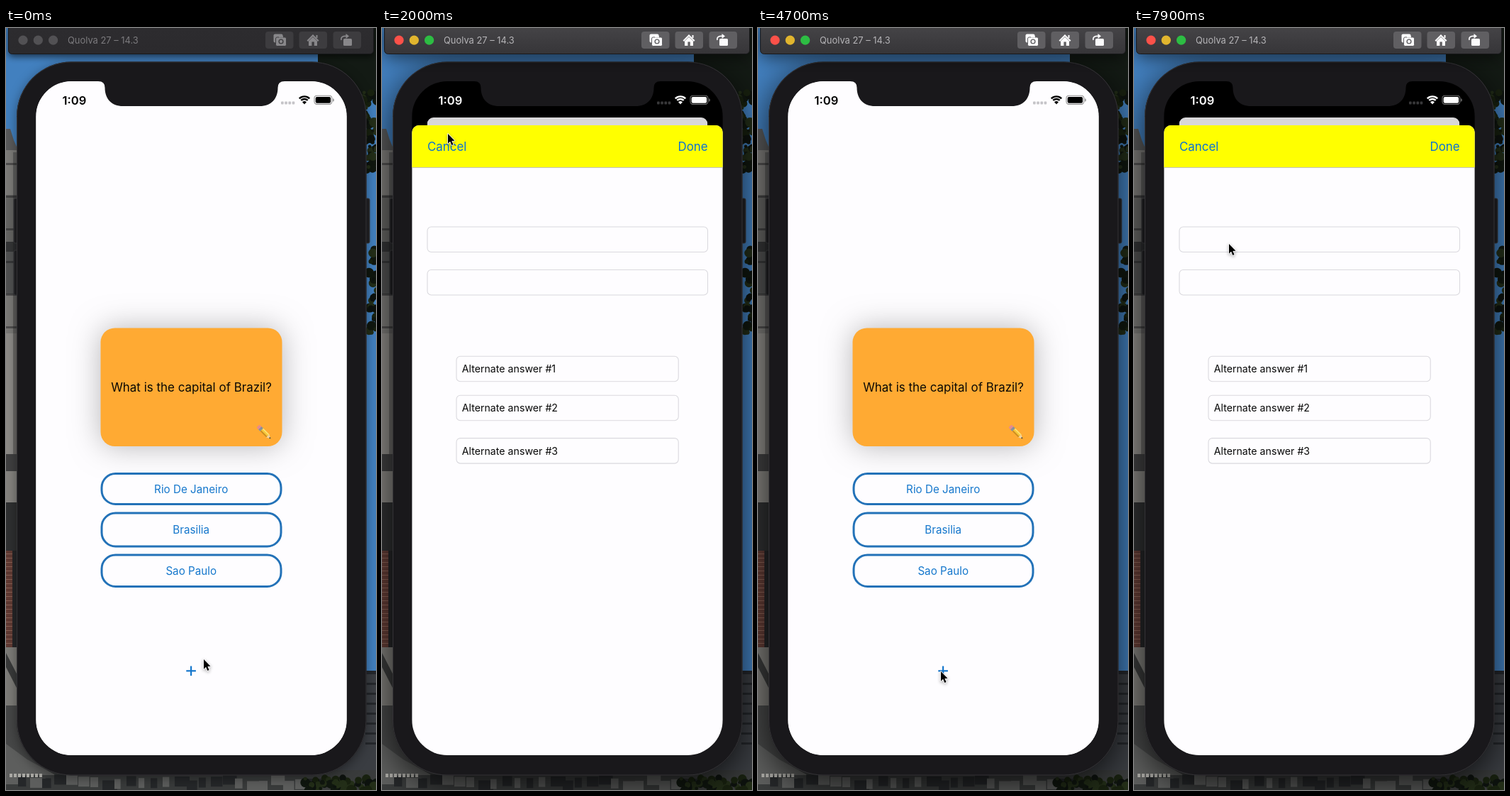
Animation, 522 px wide and 1073 px high, one loop 8000 ms. Source, as an HTML page with a canvas:

```html
<!DOCTYPE html>
<html lang="en">
<head>
<meta charset="utf-8">
<style>
html, body { margin: 0; width: 522px; height: 1073px; overflow: hidden; background: #222; }
canvas { display: block; }
</style>
</head>
<body>
<canvas id="stage" width="522" height="1073"></canvas>
<script>
const ctx = document.getElementById('stage').getContext('2d');
const LOOP = 8000, STEP = 100;
const FONT = 'Inter, "Open Sans", sans-serif';
const BODY = '#19181b', PAPER = '#fefdff', BLUE = '#1577cc';
const SCREEN = { x: 42.2, y: 75, w: 438.6, h: 949, r: 50 };
const SHEET_TOP = 137, SHEET_TRAVEL = 1024 - SHEET_TOP;
const OPEN = 801, CLOSE = 2666, REOPEN = 6382;

const clamp = v => Math.max(0, Math.min(1, v));
const mix = (a, b, p) => a + (b - a) * p;
const smooth = p => p * p * (3 - 2 * p);

// Critically damped spring, t in ms
function spring(t) {
  if (t <= 0) return 0;
  const x = t * 0.01826;
  return x > 9.5 ? 1 : 1 - (1 + x) * Math.exp(-x);
}

// Runs an easing through open, close and open again
const presented = (t, ease) =>
  t < CLOSE ? ease(t - OPEN) : t < REOPEN ? 1 - ease(t - CLOSE) : ease(t - REOPEN);

// time, x, y
const cursorPath = [
  [0, 279, 889], [500, 263, 910], [1200, 263, 910], [1900, 93, 149], [2100, 93, 149],
  [2400, 92, 162], [3300, 92, 162], [4300, 258, 906], [6900, 258, 906], [7700, 134, 304], [8000, 134, 304]
];

function cursorAt(t) {
  const i = cursorPath.findIndex(k => k[0] > t);
  const [a, b] = [cursorPath[i - 1], cursorPath[i]];
  const p = smooth((t - a[0]) / (b[0] - a[0]));
  return [mix(a[1], b[1], p), mix(a[2], b[2], p)];
}

function seeded(seed) {
  return () => (seed = (seed * 16807) % 2147483647) / 2147483647;
}

function rect(x, y, w, h, color) {
  ctx.fillStyle = color;
  ctx.fillRect(x, y, w, h);
}

function rounded(x, y, w, h, r, fill, stroke, width = 1) {
  ctx.beginPath();
  ctx.roundRect(x, y, w, h, r);
  if (fill) { ctx.fillStyle = fill; ctx.fill(); }
  if (stroke) { ctx.strokeStyle = stroke; ctx.lineWidth = width; ctx.stroke(); }
}

function disc(x, y, r, color) {
  ctx.fillStyle = color;
  ctx.beginPath();
  ctx.arc(x, y, r, 0, Math.PI * 2);
  ctx.fill();
}

function poly(points, color) {
  ctx.beginPath();
  points.forEach(([x, y]) => ctx.lineTo(x, y));
  ctx.closePath();
  ctx.fillStyle = color;
  ctx.fill();
}

function text(s, x, y, size, color, align = 'left', weight = 400) {
  ctx.font = `${weight} ${size}px ${FONT}`;
  ctx.fillStyle = color;
  ctx.textAlign = align;
  ctx.textBaseline = 'alphabetic';
  ctx.fillText(s, x, y);
}

function setShadow(color, blur, dy = 0) {
  ctx.shadowColor = color;
  ctx.shadowBlur = blur;
  ctx.shadowOffsetY = dy;
}

function foliage(x, y, w, h, count, seed) {
  const rnd = seeded(seed);
  const tones = ['#10170f', '#18210f', '#232e18', '#0d120e'];
  for (let i = 0; i < count; i++) {
    const px = x + rnd() * w, py = y + rnd() * h;
    disc(px, py, 2 + rnd() * 5, tones[Math.floor(rnd() * 4)]);
  }
}

function drawBackdrop() {
  rect(0, 0, 522, 1073, '#4280bf');

  // Stone facade: top, height, tone
  const bands = [
    [172, 63, '#7d7c79'], [235, 66, '#646462'], [301, 14, '#343536'], [315, 60, '#505151'],
    [375, 55, '#7b7a77'], [430, 170, '#8d8b87'], [600, 24, '#404041'], [624, 44, '#85837f'],
    [668, 68, '#2f3031'], [736, 136, '#613b34'], [872, 82, '#7d7c78'], [954, 119, '#464747']
  ];
  poly([[0, 142], [6, 142], [11, 158], [18, 174], [0, 174]], '#595a5b');
  for (const [y, h, tone] of bands) rect(0, y, 60, h, tone);
  rect(10, 175, 8, 425, 'rgba(25,26,28,.3)');
  for (let y = 190; y < 430; y += 46) rect(0, y, 15, 3, 'rgba(25,26,28,.45)');
  for (let y = 740; y < 870; y += 6) rect(0, y, 9, 1, '#8a6155');
  rect(9, 736, 9, 136, '#252628');
  poly([[0, 880], [18, 915], [18, 935], [0, 900]], '#393a3a');

  // Trees and far roof
  rect(440, 0, 82, 95, '#131a14');
  foliage(500, 90, 24, 115, 75, 17);
  foliage(512, 310, 12, 120, 32, 91);
  rect(460, 905, 62, 168, '#3a3d42');
  rect(500, 905, 22, 5, '#24272c');
  for (let y = 922; y < 1010; y += 14) rect(507, y, 15, 3, '#24272b');

  // Lower ledge
  rect(0, 1045, 522, 28, '#393b3b');
  poly([[0, 1008], [30, 1030], [70, 1052], [0, 1052]], '#5d5e5d');
  const rnd = seeded(53);
  for (let x = 0; x < 430; x += 17) {
    rect(x, 1051 + rnd() * 10, 8 + rnd() * 14, 14, rnd() > 0.5 ? '#252729' : '#5d5e5d');
  }
  for (let x = 5; x < 48; x += 6) rect(x, 1050, 4, 5, '#aaa9a4');
  foliage(422, 1056, 102, 19, 70, 33);
}

function drawToolbarIcons(ink, key) {
  ctx.lineJoin = 'round';
  // Stacked camera
  rounded(377.5, 8.5, 13, 12, 2, ink);
  rounded(380.5, 13, 15, 12.5, 2, ink, key, 1);
  rect(385, 11.5, 6, 2, ink);
  disc(388, 19, 3.6, key);
  disc(388, 19, 2.2, ink);
  // House
  poly([[424.5, 17.5], [433, 9], [441.5, 17.5], [440, 19], [433, 12], [426, 19]], ink);
  poly([[427, 18.5], [433, 12.8], [439, 18.5], [439, 25], [427, 25]], ink);
  rect(431.4, 19.5, 3.4, 5.5, key);
  rect(437.5, 10, 2, 4, ink);
  // Rotate
  rounded(476, 15, 12, 10, 1.5, ink);
  ctx.strokeStyle = ink;
  ctx.lineWidth = 1.6;
  ctx.beginPath();
  ctx.moveTo(473, 17);
  ctx.bezierCurveTo(472, 12, 476, 11, 481, 11.5);
  ctx.stroke();
  poly([[479.5, 8], [484, 11.5], [479.5, 15]], ink);
}

function drawToolbar(active) {
  const fill = ctx.createLinearGradient(0, 0, 0, 37);
  fill.addColorStop(0, active ? '#444346' : '#2d2c2f');
  fill.addColorStop(1, active ? '#363538' : '#2b2a2d');
  setShadow('rgba(0,0,0,.6)', active ? 24 : 10, 4);
  rounded(3.5, -8, 515, 44.5, 5, fill);
  setShadow('transparent', 0);
  rounded(3.5, -8, 515, 44.5, 5, null, '#19191b', 1);
  const lights = active ? ['#fc5149', '#e1b52e', '#2dbd43'] : Array(3).fill('#525154');
  lights.forEach((c, i) => disc(24 + i * 21.3, 17.2, 6.6, c));
  text('Quolva 27 – 14.3', 87, 22, 12.9, active ? '#b5b4b7' : '#7c7b7e');
  const key = active ? '#605f62' : '#3d3c3f';
  for (const x of [366, 413.5, 461.5]) rounded(x, 5, 39.5, 24, 4, key);
  drawToolbarIcons(active ? '#fbfbfc' : '#88878a', key);
}

function drawDevice(active) {
  for (const [x, y] of [[11, 240], [11, 313], [507, 240]]) {
    rounded(x, y, 6, 63, 2, '#222225', '#3d3d40', 1);
  }
  setShadow(active ? 'rgba(0,0,0,.75)' : 'rgba(0,0,0,.4)', active ? 50 : 16, active ? 12 : 4);
  rounded(15, 47.5, 493.5, 1005, 77, BODY);
  setShadow('transparent', 0);
  rounded(15.5, 48, 492.5, 1004, 76.5, null, '#343336', 1);
}

function drawPencil() {
  ctx.save();
  ctx.translate(355.5, 560.5);
  ctx.rotate(Math.PI / 4);
  rounded(0, -3, 5, 6, 1.5, '#e58b8d');
  rect(4, -3, 3.5, 6, '#87919a');
  rect(7.5, -3, 12, 6, '#f5c83c');
  rect(7.5, 1, 12, 2, '#cf8d20');
  rect(7.5, -3, 12, 1.5, '#ffe477');
  poly([[19.5, -3], [25, 0], [19.5, 3]], '#f1d3a1');
  poly([[23, -1.2], [25.5, 0], [23, 1.2]], '#333');
  ctx.restore();
}

function drawQuiz(p) {
  const { x, y, w, h, r } = SCREEN;
  const scale = mix(1, 0.902, p);
  ctx.save();
  ctx.translate(261.5, mix(y, 126, p));
  ctx.scale(scale, scale);
  ctx.translate(-261.5, -y);
  ctx.beginPath();
  ctx.roundRect(x, y, w, h, mix(r, 10, p));
  ctx.clip();
  rect(x, y, w, h, PAPER);

  setShadow('rgba(0,0,0,.28)', 42);
  rounded(133.5, 422.5, 256, 166.5, 20, '#ffaa33');
  setShadow('transparent', 0);
  text('What is the capital of Brazil?', 261.5, 512.3, 16.95, '#0b0905', 'center');
  drawPencil();

  for (const [label, top, height] of [['Rio De Janeiro', 626, 46], ['Brasilia', 681.5, 50], ['Sao Paulo', 740.5, 47.5]]) {
    rounded(135, top + 1.5, 253, height - 3, 19.5, PAPER, '#2372b8', 3);
    text(label, 261.2, top + height / 2 + 5.8, 15.2, BLUE, 'center');
  }
  rect(254.3, 904.2, 13.6, 2.2, BLUE);
  rect(260, 898.5, 2.2, 13.6, BLUE);
  if (p > 0) rect(x, y, w, h, `rgba(0,0,0,${0.15 * p})`);
  ctx.restore();
}

function drawSheet(top) {
  const { x, w } = SCREEN;
  ctx.save();
  ctx.translate(0, top);
  rounded(x, 0, w, 960, [10, 10, 0, 0], PAPER);
  rounded(x, 0, w, 59, [10, 10, 0, 0], '#ffff00');
  rect(x, 59, w, 0.8, '#b4b4a4');
  text('Cancel', 64, 35.7, 16.9, '#0a72d6');
  text('Done', 459.7, 35.7, 16.9, '#0a72d6', 'right');
  const field = (fx, fy, fw) => rounded(fx, fy, fw, 35.5, 5.5, PAPER, '#dad9de', 1.1);
  field(64, 143, 395.5);
  field(64, 203.5, 395.5);
  [325.3, 380.3, 440.6].forEach((fy, i) => {
    field(105, fy, 313.2);
    text(`Alternate answer #${i + 1}`, 112.7, fy + 23, 14.2, '#080808');
  });
  ctx.restore();
}

function drawStatus(p, amount) {
  const level = Math.round(255 * amount);
  const ink = `rgb(${level},${level},${level})`;
  text('1:09', 79.5, 107.7, 16.6, ink, 'left', 600);
  for (let i = 0; i < 4; i++) {
    rounded(388 + i * 5.2, 103.5, 3.7, 4, 1, p > 0.5 ? '#38383a' : '#c5c4c8');
  }
  // Wi-Fi fan
  ctx.strokeStyle = ink;
  ctx.lineWidth = 2.3;
  ctx.lineCap = 'butt';
  for (const r of [10.2, 6.6]) {
    ctx.beginPath();
    ctx.arc(421, 106.6, r, Math.PI * 1.25, Math.PI * 1.75);
    ctx.stroke();
  }
  poly([[421, 107.5], [418, 104.3], [419.6, 103.2], [421, 102.9], [422.4, 103.2], [424, 104.3]], ink);
  // Battery
  ctx.globalAlpha = 0.45;
  rounded(435, 95.2, 24.8, 12.2, 3.6, null, ink, 1.1);
  rounded(461.2, 99.3, 1.6, 4.2, [0, 1.5, 1.5, 0], ink);
  ctx.globalAlpha = 1;
  rounded(436.7, 96.9, 21.4, 8.8, 2, ink);
}

function drawNotch() {
  ctx.beginPath();
  ctx.moveTo(130, 73);
  ctx.lineTo(130, 75);
  ctx.quadraticCurveTo(139.5, 75, 139.5, 84);
  ctx.bezierCurveTo(139.5, 100, 149, 110, 165, 110);
  ctx.lineTo(358, 110);
  ctx.bezierCurveTo(374, 110, 383.5, 100, 383.5, 84);
  ctx.quadraticCurveTo(383.5, 75, 393, 75);
  ctx.lineTo(393, 73);
  ctx.closePath();
  ctx.fillStyle = BODY;
  ctx.fill();
}

function drawScreen(t) {
  const p = presented(t, spring);
  const light = presented(t, ms => clamp(ms / (t < CLOSE || t >= REOPEN ? 400 : 300)));
  const { x, y, w, h, r } = SCREEN;
  ctx.save();
  ctx.beginPath();
  ctx.roundRect(x, y, w, h, r);
  ctx.clip();
  rect(x, y, w, h, p > 0 ? '#000' : PAPER);
  drawQuiz(p);
  if (p > 0) drawSheet(Math.round(SHEET_TOP + SHEET_TRAVEL * (1 - p)));
  drawStatus(p, light);
  ctx.restore();
  drawNotch();
}

function drawCursor(x, y) {
  ctx.save();
  ctx.translate(x, y);
  ctx.scale(0.9, 0.9);
  ctx.beginPath();
  [[0, 0], [0, 15.2], [3.4, 12], [5.9, 17.8], [8.4, 16.7], [6, 11.1], [10.6, 10.8]]
    .forEach(([px, py]) => ctx.lineTo(px, py));
  ctx.closePath();
  ctx.lineJoin = 'round';
  ctx.lineWidth = 1.8;
  ctx.strokeStyle = '#fff';
  setShadow('rgba(0,0,0,.4)', 4, 1.5);
  ctx.stroke();
  setShadow('transparent', 0);
  ctx.fillStyle = '#000';
  ctx.fill();
  ctx.restore();
}

function render(t) {
  const active = t >= 500;
  drawBackdrop();
  drawDevice(active);
  drawToolbar(active);
  drawScreen(t);
  drawCursor(...cursorAt(t));
}

const start = performance.now();
let shown = -1;
function tick() {
  const t = Math.floor(((performance.now() - start) % LOOP) / STEP) * STEP;
  if (t !== shown) render(shown = t);
  requestAnimationFrame(tick);
}
tick();
</script>
</body>
</html>
```
